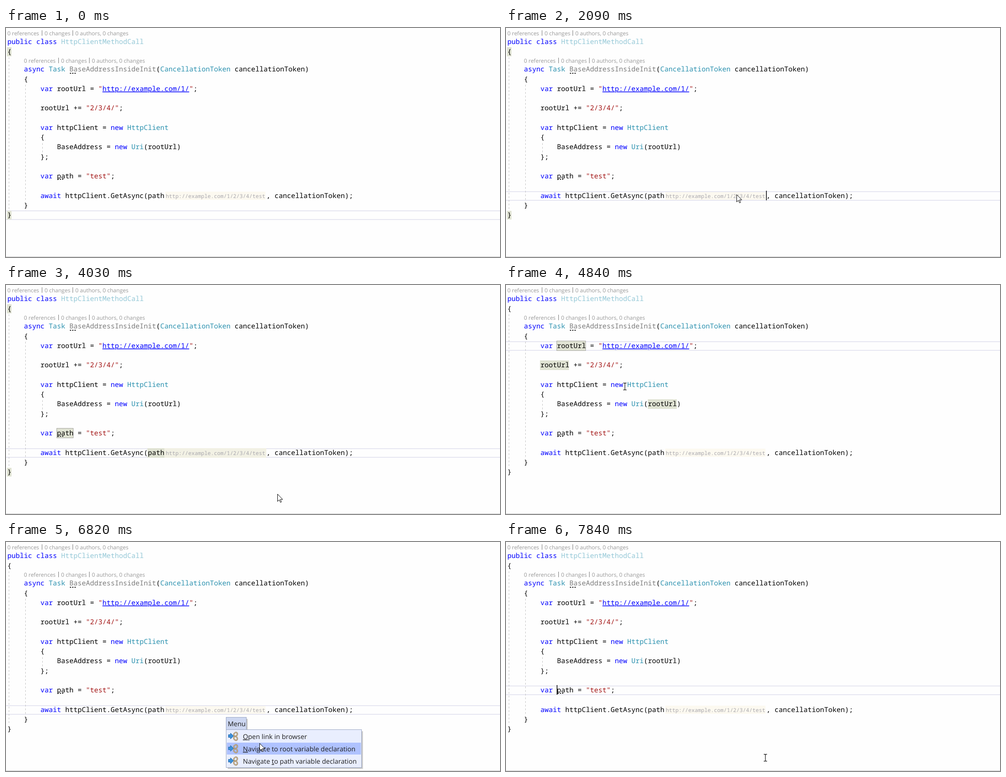
Animation, 1076 px wide and 501 px high, one loop 8 s. Source, as an HTML page:

```html
<!DOCTYPE html>
<html lang="en">
<head>
<meta charset="utf-8">
<title>Code editor link menu</title>
<style>
html, body { margin: 0; width: 100%; height: 100%; overflow: hidden; background: #fefefe; }
svg { display: block; width: 1076px; height: 501px; }
text { white-space: pre; text-rendering: geometricPrecision; }
.code { font: 15px "Noto Sans Mono", "DejaVu Sans Mono", monospace; fill: #000; }
.lens { font: 12px "Open Sans", "Noto Sans", sans-serif; fill: #999; }
.hint { font: 11.67px "Noto Sans Mono", "DejaVu Sans Mono", monospace; fill: #a9a8ae; }
.menu { font: 14.46px "Open Sans", "Noto Sans", sans-serif; fill: #1e1e1e; }
.key { fill: #00f; }
.type { fill: #2b91af; }
.faded { fill: #95c8d7; }
.unused { fill: #7c7c7c; }
.str { fill: #a31515; }
.url { fill: #00f; text-decoration: underline; }
.access { text-decoration: underline; }
.mark { fill: #e0e3d3; }
.boxed { stroke: #a5a5a0; }
</style>
</head>
<body>
<svg id="stage" viewBox="0 0 1076 501"></svg>
<script>
const LOOP = 8000;
const stage = document.getElementById('stage');

function add(parent, tag, attrs = {}, content) {
  const node = document.createElementNS('http://www.w3.org/2000/svg', tag);
  for (const name in attrs) node.setAttribute(name, attrs[name]);
  if (content !== undefined) node.textContent = content;
  parent.append(node);
  return node;
}
const group = (parent = stage) => add(parent, 'g');
const rect = (parent, x, y, width, height, attrs) =>
  add(parent, 'rect', { x, y, width, height, ...attrs });
const show = (node, visible) => node.setAttribute('display', visible ? 'inline' : 'none');
const move = (node, x, y) => node.setAttribute('transform', `translate(${x} ${y})`);

// Tokens are plain strings or [class, text] pairs.
function line(parent, style, x, y, ...tokens) {
  const text = add(parent, 'text', { class: style, x, y });
  for (const token of tokens) {
    const [cls, value] = Array.isArray(token) ? token : ['', token];
    add(text, 'tspan', { class: cls }, value);
  }
}
const code = (x, y, ...tokens) => line(stage, 'code', x, y, ...tokens);
const key = text => ['key', text];
const type = text => ['type', text];
const str = text => ['str', text];

function mark(parent, x, y, width, height, boxed) {
  rect(parent, x, y, width, height, { class: boxed ? 'mark boxed' : 'mark' });
}

// Layers below the code
rect(stage, 347, 358, 218, 18, { fill: '#fcf9f0' });
const currentLine = rect(stage, -4, 0, 1084, 19, { fill: 'none', stroke: '#e6e6f1', 'stroke-width': 2 });

const braceMarks = group();
mark(braceMarks, 2, 42, 10, 20);
mark(braceMarks, 2, 400, 10, 19);

const pathMarks = group();
mark(pathMarks, 110.5, 313.5, 36, 21, true);
mark(pathMarks, 308, 357, 37, 21);
rect(pathMarks, 345, 357, 222, 21, { fill: '#f2f1e4' });

const rootMarks = group();
mark(rootMarks, 110.5, 122.5, 63, 21, true);
mark(rootMarks, 74, 165, 63, 21);
mark(rootMarks, 309, 250, 63, 21);

// Indent guides and suggestion dots
const guide = (x, from, to) => add(stage, 'path', {
  d: `M${x + .5} ${from}V${to}`, stroke: '#c4c4c4', 'stroke-dasharray': '4 4'
});
guide(6, 64, 400);
guide(42, 124, 380);
guide(79, 252, 274);
const dots = (x, y) => add(stage, 'path', {
  d: `M${x} ${y}h14`, stroke: '#333', 'stroke-width': 2, 'stroke-dasharray': '3 2'
});
dots(139, 99);
dots(112, 331);

function lens(x, y) {
  line(stage, 'lens', x, y, '0 references');
  line(stage, 'lens', x + 81, y, '0 changes');
  line(stage, 'lens', x + 148, y, '0 authors, 0 changes');
  for (const dx of [75, 142]) rect(stage, x + dx, y - 11, 1, 12, { fill: '#777' });
}
lens(3, 16);
lens(39, 76);

code(3, 35, key('public class '), ['faded', 'HttpClientMethodCall']);
code(3, 57, '{');
code(39, 95, key('async '), type('Task '), ['unused', 'BaseAddressInsideInit'], '(',
  type('CancellationToken'), ' cancellationToken)');
code(39, 117, '{');
code(75, 138, key('var'), ' rootUrl = ', str('"'), ['url', 'http://example.com/1/'], str('"'), ';');
code(75, 180, 'rootUrl += ', str('"2/3/4/"'), ';');
code(75, 223, key('var'), ' httpClient = ', key('new '), type('HttpClient'));
code(75, 244, '{');
code(111, 265, 'BaseAddress = ', key('new '), type('Uri'), '(rootUrl)');
code(75, 287, '};');
code(75, 329, key('var'), ' path = ', str('"test"'), ';');
code(75, 372, key('await'), ' httpClient.GetAsync(path');
line(stage, 'hint', 348, 372, 'http://example.com/1/2/3/4/test');
code(567, 372, ', cancellationToken);');
code(39, 393, '}');
code(3, 414, '}');
rect(stage, 0, 500, 1076, 1, { fill: '#c8c8c8' });

const caret = rect(stage, 0, 0, 1.5, 21, { fill: '#000' });

// Popup menu, drawn from its top left corner
const menu = group();
const popup = group(menu);
for (let i = 0; i <= 3; i++) {
  rect(popup, 4, 31, 292 + i, 80 + i, { fill: '#000', opacity: .09 });
}
rect(popup, .5, 27.5, 295, 83, { fill: '#e9eefe', stroke: '#9ba7c4' });
const hover = rect(popup, 2, 0, 292, 26, { fill: '#afc2ff' });

function icon(y) {
  const g = group(popup);
  move(g, 5, y);
  add(g, 'path', { d: 'M.5 -3.5H5V-7L11.5 -.5 5 6V2.5H.5Z', fill: '#3d92dc', stroke: '#2469a8' });
  for (const [cy, angle] of [[-4, 35], [4.5, -35]]) {
    const link = { x: 12.5, y: cy - 4.5, width: 7, height: 9, rx: 3.5, fill: 'none',
      transform: `rotate(${angle} 16 ${cy})` };
    add(g, 'rect', { ...link, stroke: '#77603f', 'stroke-width': 2.6 });
    add(g, 'rect', { ...link, stroke: '#dcc59c', 'stroke-width': 1.5 });
  }
}
[
  ['', 'O', 'pen link in browser'],
  ['', 'N', 'avigate to root variable declaration'],
  ['Navigate ', 't', 'o path variable declaration']
].forEach(([before, access, after], i) => {
  icon(42 + 27 * i);
  line(popup, 'menu', 37, 48 + 27 * i, before, ['access', access], after);
});
for (let i = 1; i <= 3; i++) rect(menu, 45, 4, i, 23, { fill: '#000', opacity: .09 });
rect(menu, .5, .5, 44, 27, { fill: '#cdd7f1', stroke: '#9ba7c4' });
line(menu, 'menu', 4, 20, 'Menu');

// Pointers
const arrow = add(stage, 'path', {
  d: 'M.5 .5V16.5L4.2 13 6.7 18.6 9 17.6 6.6 12.1H11.6Z', fill: '#fff', stroke: '#000'
});
const beam = add(stage, 'path', {
  d: 'M-3.5 -7.5H-1L0 -6.5 1 -7.5H3.5M0 -6.5V6.5M-3.5 7.5H-1L0 6.5 1 7.5H3.5',
  fill: 'none', stroke: '#222', 'stroke-width': 1.3
});

// Pointer stops: time, x, y
const track = [
  [590, 954, 475], [800, 794, 363], [1000, 794, 363], [1340, 640, 350], [1690, 502, 364],
  [2620, 502, 364], [2890, 593, 438], [3080, 593, 438], [3150, 593, 440], [3430, 591, 457],
  [4300, 591, 457], [4700, 330, 270], [5060, 149, 147], [5130, 149, 147],
  [5500, 380, 290], [5780, 524, 366], [5950, 467, 363],
  [6690, 467, 363], [6820, 552, 440], [7440, 565, 472]
];
function pointerAt(t) {
  const next = track.findIndex(stop => stop[0] > t);
  if (next < 1) return track.at(next < 0 ? -1 : 0).slice(1);
  const [t0, x0, y0] = track[next - 1];
  const [t1, x1, y1] = track[next];
  const k = (t - t0) / (t1 - t0);
  return [Math.round(x0 + (x1 - x0) * k), Math.round(y0 + (y1 - y0) * k)];
}

const within = (t, from, to) => t >= from && t < to;

function render(t) {
  const [x, y] = pointerAt(t);
  const atRoot = within(t, 4100, 6280);
  const atPath = t >= 7840;

  const lineTop = t < 2090 ? 400 : atRoot ? 124 : atPath ? 315 : 358;
  currentLine.setAttribute('y', lineTop);
  show(braceMarks, t < 4100);
  show(pathMarks, within(t, 2420, 4100));
  show(rootMarks, within(t, 4430, 6280));

  const blinkOn = t < 4360 || Math.floor((t - 4360) / 530) % 2 === 1;
  show(caret, within(t, 2090, 2160) || within(t, 6280, 6350) || atPath || (atRoot && blinkOn));
  move(caret, atRoot || atPath ? 110.5 : 566.5, lineTop - 2);

  const [menuX, menuY] = t > 5000 ? [479, 383] : [514, 384];
  show(menu, within(t, 2160, 4030) || within(t, 6350, 7770));
  show(popup, within(t, 2160, 3960) || within(t, 6350, 7700));
  move(menu, menuX, menuY);
  const item = Math.max(0, Math.min(2, Math.floor((y - menuY - 29) / 27)));
  hover.setAttribute('y', 29 + 27 * item);

  const overHint = within(x, 347, 566) && within(y, 358, 377);
  const isArrow = overHint || within(t, 2090, 4100) || within(t, 6280, 7840);
  show(arrow, t >= 590 && isArrow);
  show(beam, t >= 590 && !isArrow);
  move(arrow, x, y);
  move(beam, x, y);
}

const start = performance.now();
function tick() {
  render((performance.now() - start) % LOOP);
  requestAnimationFrame(tick);
}
tick();
</script>
</body>
</html>
```
